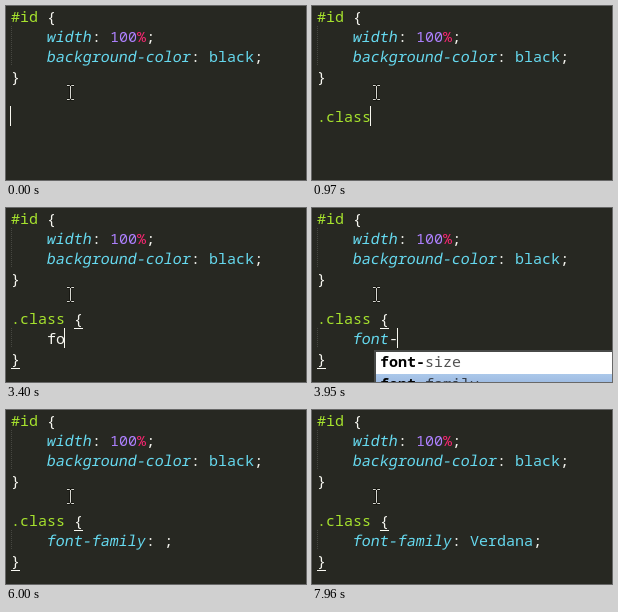
An HTML page for the animation above (8000 ms loop, 300 by 174 pixels).

```html
<!DOCTYPE html>
<html lang="en">
<head>
<meta charset="utf-8">
<title>Typing CSS in an editor</title>
<style>
  html, body { margin: 0; width: 100%; height: 100%; overflow: hidden; background: #272822; }
  svg { display: block; width: 300px; height: 174px; }
  text { font: 500 15px "Noto Sans Mono", "DejaVu Sans Mono", monospace; white-space: pre; font-variant-ligatures: none; }
  .sel { fill: #a6e22e; }
  .txt { fill: #f8f8f2; }
  .prop, .val { fill: #66d9ef; }
  .num { fill: #ae81ff; }
  .unit { fill: #f92672; }
  .rest { font-weight: 400; fill: #000; fill-opacity: .68; }
  .hit { font-weight: 700; fill: #000; }
  .guide { stroke: #464741; stroke-dasharray: 1 1; }
</style>
</head>
<body>
<svg viewBox="0 0 300 174">
  <defs>
    <linearGradient id="pick" x1="0" y1="0" x2="0" y2="1">
      <stop offset="0" stop-color="#abc8ea"/>
      <stop offset="1" stop-color="#8aa9d6"/>
    </linearGradient>
  </defs>
  <rect width="300" height="174" fill="#272822"/>
  <g id="code"></g>
  <g id="pointer" fill="none">
    <path d="M61 79.5h2.5l1 1 1-1H68M64.5 80v12M61 93.5h2.5l1-1 1 1H68" stroke="#15150f" stroke-width="2.6"/>
    <path d="M61 79.5h2.5l1 1 1-1H68M64.5 80v12M61 93.5h2.5l1-1 1 1H68" stroke="#d8d8d2"/>
  </g>
  <g id="popup"></g>
</svg>
<script>
const LOOP = 8000, CELL = 9, LINE = 20, LEFT = 5;
const ITEM = 22, BORDER = 2;
const code = document.getElementById('code');
const popup = document.getElementById('popup');

const FONTS = ['font-size', 'font-family'];
const TAGS = ['caption', 'center', 'cite'];

// Each step changes only the named parts of the state.
const steps = [
  [0, { sel: '', body: '', value: null, open: 0, col: 0, row: 5, caret: 1, pop: null }],
  [150, { sel: '.', col: 1 }],
  [560, { sel: '.c', col: 2, pop: { col: 1, items: TAGS, pick: 0, hit: 1 } }],
  [690, { sel: '.cl', col: 3 }],
  [830, { sel: '.clas', col: 5, pop: null }],
  [970, { sel: '.class', col: 6 }],
  [1400, { col: 7 }],
  [1680, { open: 1, col: 8 }],
  [1960, { open: 2, col: 4, row: 6 }],
  [2650, { caret: .5 }],
  [2810, { caret: 0 }],
  [3270, { body: 'f', col: 5, caret: 1 }],
  [3400, { body: 'fo', col: 6 }],
  [3530, { body: 'fon', col: 7, pop: { col: 7, items: FONTS, pick: 1, hit: 3 } }],
  [3720, { body: 'font', col: 8, pop: { col: 7, items: FONTS, pick: 1, hit: 4 } }],
  [3950, { body: 'font-', col: 9, pop: { col: 7, items: FONTS, pick: 1, hit: 5 } }],
  ...['f', 'fa', 'fam', 'fami'].map((s, i) => family(4230 + Math.round(i * 156.7), s)),
  family(4980, 'family'),
  [5290, { pop: null }],
  [5440, { value: '', col: 17 }],
  [5850, { caret: .5 }],
  [6000, { caret: 0 }],
  value(6410, 'V'), value(6690, 'Ve'), value(6840, 'Ver'),
  value(7120, 'Verd'), value(7260, 'Verdan'), value(7400, 'Verdana'),
  [7810, { caret: .5 }],
  [7960, { caret: 0 }]
];

function family(t, s) {
  const body = 'font-' + s;
  return [t, { body, col: 4 + body.length,
    pop: { col: 7, items: ['font-family'], pick: 0, hit: body.length } }];
}

function value(t, s) {
  return [t, { value: s, col: 17 + s.length, caret: 1 }];
}

let last = {};
const states = steps.map(([t, change]) => last = { ...last, ...change, t });

function add(parent, tag, attrs, text) {
  const el = document.createElementNS('http://www.w3.org/2000/svg', tag);
  for (const key in attrs) el.setAttribute(key, attrs[key]);
  if (text) el.textContent = text;
  parent.append(el);
}

function put(col, row, text, cls) {
  const x = LEFT + col * CELL, y = row * LINE + 16;
  // Slant around the middle of the letters.
  const slant = cls === 'prop' ? ' translate(-1 0) skewX(-10)' : '';
  add(code, 'text', { class: cls, transform: `translate(${x} ${y})${slant}` }, text);
}

function box(parent, x, y, width, height, fill, opacity = 1) {
  add(parent, 'rect', { x, y, width, height, fill, opacity });
}

function guide(row, rows) {
  add(code, 'path', { class: 'guide', d: `M5.5 ${row * LINE}v${rows * LINE}` });
}

function brace(col, row, char) {
  put(col, row, char, 'txt');
  box(code, LEFT + col * CELL, (row + 1) * LINE, CELL, 1, '#f8f8f2');
}

function drawFirstRule() {
  guide(1, 2);
  put(0, 0, '#id', 'sel');
  put(4, 0, '{', 'txt');
  put(4, 1, 'width', 'prop');
  put(9, 1, ':', 'txt');
  put(11, 1, '100', 'num');
  put(14, 1, '%', 'unit');
  put(15, 1, ';', 'txt');
  put(4, 2, 'background-color', 'prop');
  put(20, 2, ':', 'txt');
  put(22, 2, 'black', 'val');
  put(27, 2, ';', 'txt');
  put(0, 3, '}', 'txt');
}

function drawSecondRule(s) {
  put(0, 5, s.sel, s.sel.length > 1 ? 'sel' : 'txt');
  if (s.open) {
    brace(7, 5, '{');
    s.open === 1 ? brace(8, 5, '}') : brace(0, 7, '}');
  }
  if (s.body) {
    guide(6, 1);
    // Only known property names are highlighted.
    const known = s.body === 'font-family' ? 11 : s.body.startsWith('font') ? 4 : 0;
    put(4, 6, s.body.slice(0, known), 'prop');
    put(4 + known, 6, s.body.slice(known), 'txt');
  }
  if (s.value !== null) {
    put(15, 6, ':', 'txt');
    put(17, 6, s.value, s.value === 'Verdana' ? 'val' : 'txt');
    put(17 + s.value.length, 6, ';', 'txt');
  }
  box(code, LEFT + s.col * CELL - 1, s.row * LINE, 1, LINE, '#f8f8f0', s.caret);
}

function drawPopup({ col, items, pick, hit }, row) {
  const x = LEFT + col * CELL - 6, y = (row + 1) * LINE + 2;
  box(popup, x, y, 300, items.length * ITEM + 2 * BORDER, '#484a48');
  items.forEach((item, i) => {
    const top = y + BORDER + i * ITEM;
    box(popup, x + BORDER, top, 300, ITEM, i === pick ? 'url(#pick)' : '#fff');
    const at = n => ({ x: x + 6 + n * CELL, y: top + 15 });
    add(popup, 'text', { class: 'hit', ...at(0) }, item.slice(0, hit));
    add(popup, 'text', { class: 'rest', ...at(hit) }, item.slice(hit));
  });
}

let shown = null;
function draw(now) {
  const t = (now - start) % LOOP;
  const s = states.findLast(state => state.t <= t) || states[0];
  if (s !== shown) {
    shown = s;
    code.replaceChildren();
    popup.replaceChildren();
    drawFirstRule();
    drawSecondRule(s);
    if (s.pop) drawPopup(s.pop, s.row);
  }
  requestAnimationFrame(draw);
}

const start = performance.now();
draw(start);
</script>
</body>
</html>
```
